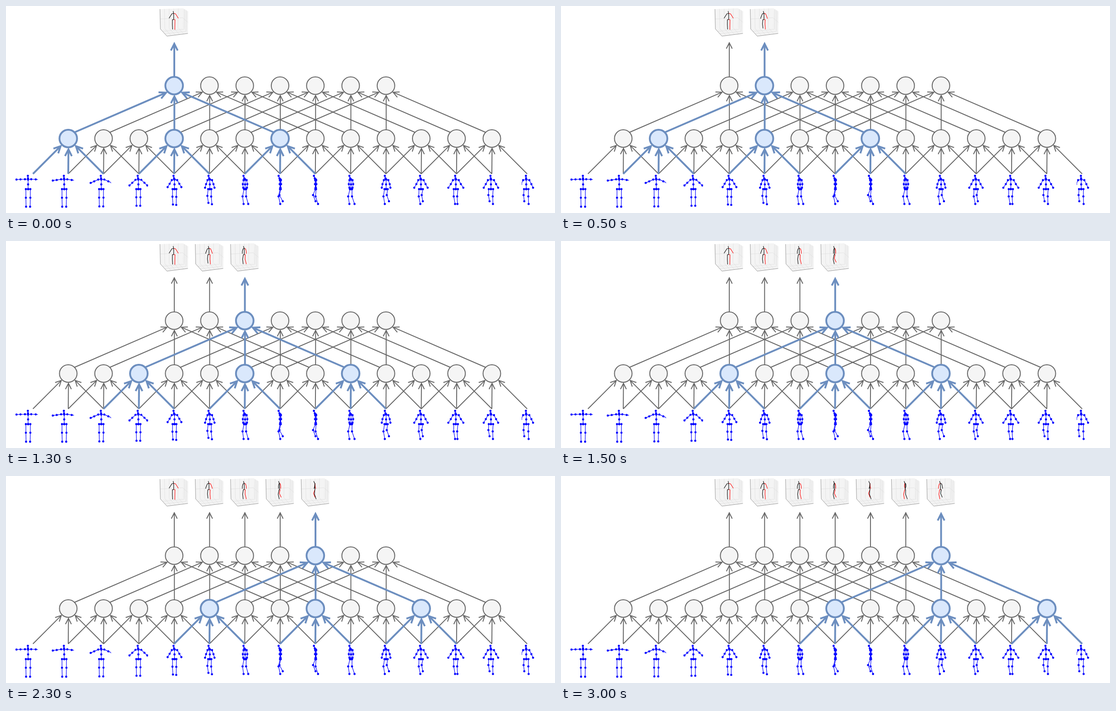
Write an HTML page with a canvas that moves like this. It is 1217 by 460 pixels and loops after 3.5 s.

```html
<!DOCTYPE html>
<html lang="en">
<head>
<meta charset="utf-8">
<title>Dilated convolution over poses</title>
<style>
  html, body { margin: 0; width: 100%; height: 100%; overflow: hidden; background: #fff; }
  canvas { display: block; width: 1217px; height: 460px; }
</style>
</head>
<body>
<canvas id="stage"></canvas>
<script>
const W = 1217, H = 460, STEP = 500, STEPS = 7;
const canvas = document.getElementById('stage');
const ctx = canvas.getContext('2d');
const ratio = window.devicePixelRatio || 1;
canvas.width = W * ratio;
canvas.height = H * ratio;

const TOP = 177, MID = 294.5, BASE = 373, R = 19.5, CORNER = R * Math.SQRT1_2;
const GREY = { line: '#666666', fill: '#f5f5f5', width: 2, head: 13 };
const BLUE = { line: '#6c8ebf', fill: '#dae8fc', width: 4, head: 15 };
const col = i => 59.75 + 78.25 * i;

// Smooth step from 0 at a to 1 at b.
function ramp(a, b, x) {
  const t = Math.min(1, Math.max(0, (x - a) / (b - a)));
  return t * t * (3 - 2 * t);
}

function path(points, color, width) {
  ctx.beginPath();
  points.forEach(([x, y]) => ctx.lineTo(x, y));
  ctx.strokeStyle = color;
  ctx.lineWidth = width;
  ctx.stroke();
}

function disc(x, y, r, fill) {
  ctx.beginPath();
  ctx.arc(x, y, r, 0, 2 * Math.PI);
  ctx.fillStyle = fill;
  ctx.fill();
}

// ---- Network ----
function arrow(x1, y1, x2, y2, s) {
  const len = Math.hypot(x2 - x1, y2 - y1);
  const ux = (x2 - x1) / len, uy = (y2 - y1) / len;
  const back = s.width * 1.118;   // room for the mitred tip
  const tx = x2 - ux * back, ty = y2 - uy * back;
  const wing = side => [
    tx - s.head * (ux + side * uy / 2),
    ty - s.head * (uy - side * ux / 2)
  ];
  path([[x1, y1], [tx, ty]], s.line, s.width);
  path([wing(1), [tx, ty], wing(-1)], s.line, s.width);
}

function node(x, y, s) {
  disc(x, y, R, s.fill);
  ctx.strokeStyle = s.line;
  ctx.lineWidth = s.width;
  ctx.stroke();
}

const feeds = (mid, top) => [0, 3, 6].includes(mid - top);

function edges(step, active) {
  const s = active ? BLUE : GREY;
  const fan = draw => [-1, 0, 1].forEach(d => draw(d, d ? CORNER : R, d ? 0 : .5));
  for (let m = 0; m < 13; m++) {
    if (feeds(m, step) !== active) continue;
    const x = col(m + 1);
    fan((d, off, nudge) =>
      arrow(col(m + 1 + d), BASE, x + d * CORNER + nudge, MID + off, s));
  }
  for (let k = 0; k < STEPS; k++) {
    if ((k === step) !== active) continue;
    const x = col(k + 4);
    fan((d, off, nudge) =>
      arrow(col(k + 4 + 3 * d) - d * CORNER + nudge, MID - off, x + d * CORNER + nudge, TOP + off, s));
    if (k <= step) arrow(x + .3, TOP - R, x + .3, 79.5, s);
  }
}

// ---- Walker: lowers both arms, turns around and walks ----
// Joints are placed by (sideways, height, forward), then turned about the spine.
function pose(i, lag) {
  const cos = Math.tanh((7.5 + lag - i) / 2.8), sin = Math.sqrt(1 - cos * cos);
  const turn = (x, y, z = 0) => [cos * x - sin * z, y];
  const raised = 1 - ramp(0, 5, i), gait = ramp(3, 7, i);
  const arm = (28 + 60 * raised) * Math.PI / 180;
  const phase = Math.PI * (i - 9) / 3;
  const neck = [0, 385.5], hips = [0, 407];

  function limbs(side) {
    const swing = side * gait * Math.cos(phase);
    const lift = gait * Math.max(0, -side * Math.sin(phase));
    const reach = d => 7 + d * Math.sin(arm);
    const shoulderY = 387 - 2 * raised;
    const drop = d => shoulderY + d * Math.cos(arm);
    const footY = 446 - 6 * ramp(1, 6, i) - 7 * lift;
    const footZ = 4 * swing - 2.5 * gait;
    return {
      arm: [neck, turn(side * 7, shoulderY),
        turn(side * reach(10), drop(10), -swing),
        turn(side * reach(19), drop(19), -5 * swing)],
      leg: [hips, turn(side * 5, 407),
        turn(side * 5, 407 + (footY - 407) * .49, footZ / 2 + 3.5 * gait + 2 * lift),
        turn(side * 4.5, footY, footZ)]
    };
  }
  return {
    spine: [turn(0, 377.5, 4), turn(0, 383, 2), neck, [0, 396.5], hips],
    near: limbs(-1),
    far: limbs(1)
  };
}

function flatPose(i) {
  const p = pose(i, 0);
  const drift = .75 - 11.5 * (1 - ramp(0, 4, i)) - 2.75 * ramp(9, 13, i);
  const edge = -30 + 20 * ramp(13, 14, i);
  ctx.save();
  ctx.translate(col(i) + drift, 0);
  ctx.beginPath();
  ctx.rect(edge, 370, 21.5 - edge, 85);
  ctx.clip();
  for (const bones of [p.spine, p.near.arm, p.near.leg, p.far.arm, p.far.leg]) {
    path(bones, '#0000ff', 1.2);
    bones.forEach(([x, y]) => disc(x, y, 2.4, '#0000ff'));
  }
  ctx.restore();
}

// ---- Solid view ----
const wallL = [-31.5, 7], wallB = [19.5, 5], wallR = [31, 12];
const floorL = [-30.5, 51], floorB = [18, 47], floorR = [30.5, 61], floorF = [-16, 67];
const mix = (a, b, t) => a.map((v, n) => v + (b[n] - v) * t);

function pane(a, b, c, d, fill, columns, rows) {
  ctx.beginPath();
  [a, b, c, d].forEach(([x, y]) => ctx.lineTo(x, y));
  ctx.fillStyle = fill;
  ctx.fill();
  const rule = (p, q) => path([p, q], '#d8d8d8', .6);
  for (let n = 1; n < columns; n++) rule(mix(a, b, n / columns), mix(d, c, n / columns));
  for (let n = 1; n < rows; n++) rule(mix(a, d, n / rows), mix(b, c, n / rows));
}

function solidPose(k) {
  const p = pose(k + 4, .6);
  const draw = (bones, color) =>
    path(bones.map(([x, y]) => [.64 * x - 1, 11 + .64 * (y - 377)]), color, 1.1);
  ctx.save();
  ctx.translate(col(k + 4), 0);
  pane(wallL, wallB, floorB, floorL, '#f4f4f4', 5, 2);
  pane(wallB, wallR, floorR, floorB, '#f1f1f1', 3, 2);
  pane(floorL, floorB, floorR, floorF, '#f3f3f3', 5, 3);
  path([wallL, floorL, floorF, floorR], '#707070', .7);
  ctx.lineJoin = 'round';
  draw(p.far.arm, '#ff0000');
  draw(p.far.leg, '#ff0000');
  draw(p.near.arm, '#000000');
  draw(p.near.leg, '#000000');
  draw(p.spine, '#000000');
  ctx.restore();
}

// ---- Playback ----
function draw(step) {
  ctx.setTransform(ratio, 0, 0, ratio, 0, 0);
  ctx.fillStyle = '#ffffff';
  ctx.fillRect(0, 0, W, H);
  edges(step, false);
  edges(step, true);
  for (let m = 0; m < 13; m++) node(col(m + 1), MID, feeds(m, step) ? BLUE : GREY);
  for (let k = 0; k < STEPS; k++) node(col(k + 4), TOP, k === step ? BLUE : GREY);
  for (let i = 0; i < 15; i++) flatPose(i);
  for (let k = 0; k <= step; k++) solidPose(k);
}

const start = performance.now();
let shown = -1;
function tick() {
  const step = Math.floor((performance.now() - start) / STEP) % STEPS;
  if (step !== shown) draw(shown = step);
  requestAnimationFrame(tick);
}
tick();
</script>
</body>
</html>
```
